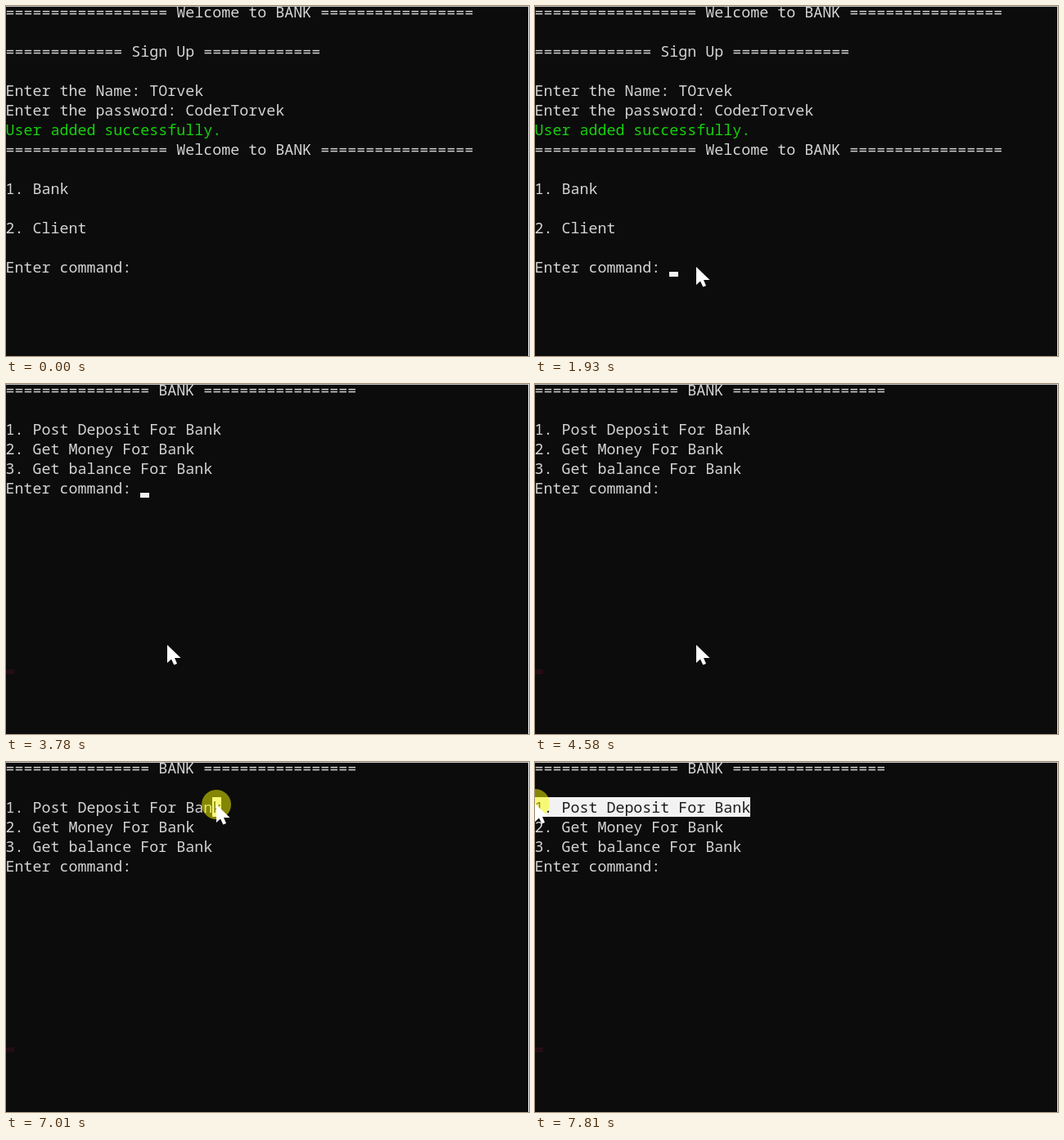
Recreate the animation shown at these times as an HTML page. Size 639 by 428 pixels, loop 8000 ms.

```html
<!DOCTYPE html>
<html lang="en">
<head>
<meta charset="utf-8">
<title>Bank console</title>
<style>
  html, body { margin: 0; width: 100%; height: 100%; overflow: hidden; background: #0c0c0c; }
  svg { display: block; width: 639px; height: 428px; }
  text { font: 500 18.333px "Noto Sans Mono", "DejaVu Sans Mono", monospace; fill: #d4d4d4; white-space: pre; }
  text.ok { fill: #16d00c; }
  #selection text { fill: #1c1c1c; }
</style>
</head>
<body>
<svg viewBox="0 0 639 428">
  <defs><clipPath id="selClip"><rect id="selArea" y="43" height="24"/></clipPath></defs>
  <rect width="639" height="428" fill="#0c0c0c"/>
  <g id="welcome"></g>
  <g id="menu"><rect y="349" width="10" height="6" fill="#240c14"/></g>
  <g id="selection" clip-path="url(#selClip)"><rect y="43" width="263" height="24" fill="#f2f2f2"/></g>
  <rect id="caret" width="11" height="6" fill="#f2f2f2"/>
  <circle id="press" r="18" fill="#ff0" fill-opacity=".5"/>
  <path id="pointer" d="M0 0V22L5 17.5 8.3 24.5 12 23 9 16H16.5Z" fill="#fff"/>
  <path d="M0 .5H639" stroke="#c4c4c4"/>
  <path d="M638.5 0V428" stroke="#e8e8e8"/>
</svg>
<script>
const LOOP = 8000, CELL = 11, ROW = 24, LEFT = -1, TOP = -5;
const STEP = 66.6, BLINK = 530;
const TYPED = 2990, ENTERED = 3580, MENU = 3710, PRESSED = 6940;

const $ = id => document.getElementById(id);
const rule = (before, title, after) => `${'='.repeat(before)} ${title} ${'='.repeat(after)}`;
const colX = col => col * CELL + LEFT;
const rowY = row => row * ROW + TOP;

function addLine(group, row, content, cls = '') {
  const el = document.createElementNS('http://www.w3.org/2000/svg', 'text');
  el.setAttribute('x', LEFT + 0.4);
  el.setAttribute('y', rowY(row) + 19);
  el.setAttribute('class', cls);
  el.textContent = content;
  return group.appendChild(el);
}

const banner = rule(18, 'Welcome to BANK', 17);
const deposit = '1. Post Deposit For Bank';
const ask = 'Enter command: ';

[banner, '', rule(13, 'Sign Up', 13), '', 'Enter the Name: TOrvek',
  'Enter the password: CoderTorvek', 'User added successfully.', banner,
  '', '1. Bank', '', '2. Client', '']
  .forEach((line, row) => addLine($('welcome'), row, line, row === 6 ? 'ok' : ''));
const prompt = addLine($('welcome'), 13, '');

[rule(16, 'BANK', 17), '', deposit, '2. Get Money For Bank', '3. Get balance For Bank', ask]
  .forEach((line, row) => addLine($('menu'), row, line));
addLine($('selection'), 2, deposit);

// Each sweep eases from the last resting point to the next, bending towards `via`.
const entry = [545, 440];
const sweeps = [
  { start: 183, steps: 12, via: [390, 370], to: [231, 330] },
  { start: 993, steps: 7, via: [142, 274], to: [197, 319] },
  { start: 5850, steps: 9, via: [311, -7], to: [277, 50] },
  { start: 6600, steps: 4, via: [265, 50], to: [257, 52] },
  { start: 7010, steps: 12, via: [128, 51], to: [0, 51] }
];

const easeOut = u => 1 - (1 - u) ** 1.6;
const bezier = (a, b, c, s) => (1 - s) ** 2 * a + 2 * s * (1 - s) * b + s * s * c;

function pointerAt(t) {
  const index = sweeps.filter(sweep => t >= sweep.start).length - 1;
  if (index < 0) return entry;
  const { start, steps, via, to } = sweeps[index];
  const from = index ? sweeps[index - 1].to : entry;
  const s = easeOut(Math.min(1, Math.floor((t - start) / STEP) / steps));
  return from.map((a, i) => Math.round(bezier(a, via[i], to[i], s)));
}

const blinkOn = (t, since) => t >= since && Math.floor((t - since) / BLINK) % 2 === 0;

function caretAt(t) {
  const col = ask.length;
  if (t < ENTERED) return blinkOn(t, 1930) && [t < TYPED ? col : col + 1, 13];
  if (t < MENU) return [0, 14];
  const on = t >= 3780 && t < 4580 || blinkOn(t, 5060);
  return on && t < PRESSED && [col, 5];
}

const show = (el, on) => el.setAttribute('display', on ? 'inline' : 'none');
const place = (el, x, y) => el.setAttribute('transform', `translate(${x} ${y})`);

function render(t) {
  const pressed = t >= PRESSED;
  show($('welcome'), t < MENU);
  show($('menu'), t >= MENU);
  show($('press'), pressed);
  show($('selection'), pressed);
  prompt.textContent = ask + (t >= TYPED ? '1' : '');

  const caret = caretAt(t);
  show($('caret'), caret);
  if (caret) place($('caret'), colX(caret[0]), rowY(caret[1]) + 18);

  const [x, y] = pointerAt(t);
  place($('pointer'), x, y);
  place($('press'), x, y);
  const from = colX(Math.floor((x - LEFT) / CELL));
  $('selArea').setAttribute('x', from);
  $('selArea').setAttribute('width', Math.max(0, colX(deposit.length) - from));
}

const origin = performance.now();
function frame() {
  render((performance.now() - origin) % LOOP);
  requestAnimationFrame(frame);
}
render(0);
requestAnimationFrame(frame);
</script>
</body>
</html>
```
